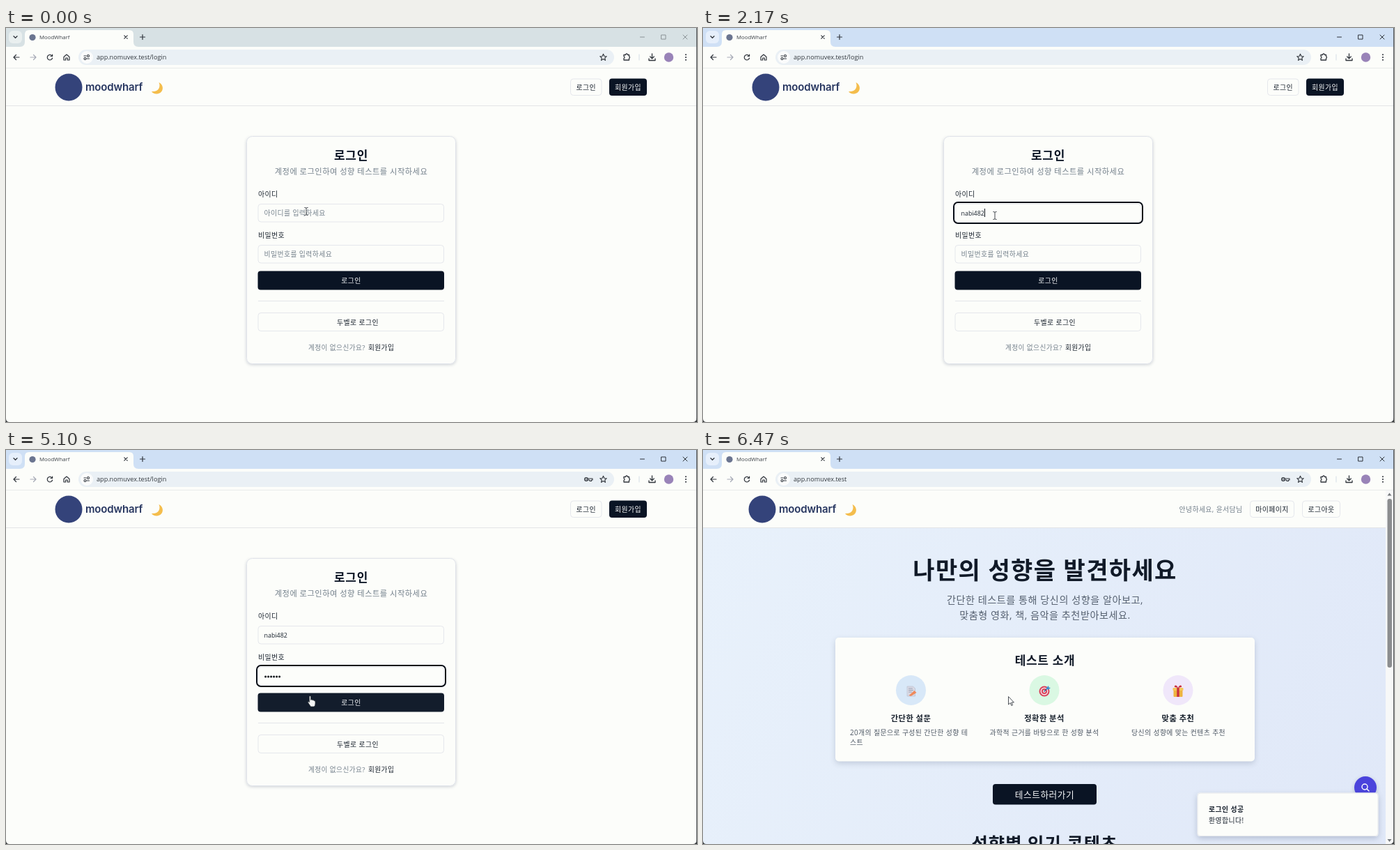
These frames come from a looping animation (992 by 565 pixels, 6.53 s). An HTML page with a canvas:

```html
<!DOCTYPE html>
<html lang="ko">
<head>
<meta charset="utf-8">
<title>MoodWharf</title>
<style>
html, body { margin: 0; width: 100%; height: 100%; overflow: hidden; background: #fcfdfa; }
canvas { display: block; }
</style>
</head>
<body>
<canvas id="stage" width="992" height="565"></canvas>
<script>
const W = 992, H = 565, LOOP = 6530;
const ctx = document.getElementById('stage').getContext('2d');
const SANS = '"Open Sans", "Noto Sans CJK KR", "Noto Sans CJK", "Noto Sans KR", sans-serif';
const PAPER = '#fcfdfa', DARK = '#0a1424', INK = '#18212d', MUTED = '#74808c', LINE = '#e5e7ec';
const BRAND = 'moodwharf', HOST = 'app.nomuvex.test', USER = 'nabi482';

// Moments of the story, in ms
const T = {
  focusId: 130, focusPw: 3070, key: 3770, hover: 5030,
  press: 5970, loading: 6070, home: 6330, toast: 6370
};
const ID_KEYS = [1270, 1370, 1470, 1600, 2000, 2070, 2170];
const PW_KEYS = [3770, 3870, 4000, 4270, 4320, 4370];
const MOVES = [
  { from: 30, to: 400, x: 419, y: 269 },
  { from: 2700, to: 3000, x: 426, y: 323 },
  { from: 4900, to: 5070, x: 439, y: 360 }
];

const clamp = v => Math.max(0, Math.min(1, v));
const span = (t, a, b) => clamp((t - a) / (b - a));
const ease = p => p * p * (3 - 2 * p);
const easeOut = p => 1 - (1 - p) ** 3;
const lerp = (a, b, p) => a + (b - a) * p;
const mix = (a, b, p) => `rgb(${a.map((v, i) => Math.round(lerp(v, b[i], p)))})`;

function box(x, y, w, h, r, fill, stroke, lw = 1) {
  ctx.beginPath();
  ctx.roundRect(x, y, w, h, r);
  if (fill) { ctx.fillStyle = fill; ctx.fill(); }
  if (stroke) { ctx.strokeStyle = stroke; ctx.lineWidth = lw; ctx.stroke(); }
}

function outline(x, y, w, h, r, fill = PAPER) {
  box(x + .5, y + .5, w - 1, h - 1, r, fill, LINE);
}

function shadowed(x, y, w, h, r, fill, blur, dy, alpha) {
  ctx.save();
  ctx.shadowColor = `rgba(40, 55, 90, ${alpha})`;
  ctx.shadowBlur = blur;
  ctx.shadowOffsetY = dy;
  box(x, y, w, h, r, fill);
  ctx.restore();
}

function disc(x, y, r, fill) {
  ctx.beginPath();
  ctx.arc(x, y, r, 0, 7);
  ctx.fillStyle = fill;
  ctx.fill();
}

function ring(x, y, r, color, lw) {
  ctx.beginPath();
  ctx.arc(x, y, r, 0, 7);
  ctx.strokeStyle = color;
  ctx.lineWidth = lw;
  ctx.stroke();
}

// SVG path data placed at x, y
function shape(d, x, y, { fill, stroke, lw = 1.2 }) {
  const path = new Path2D(d);
  ctx.save();
  ctx.translate(x, y);
  ctx.lineCap = ctx.lineJoin = 'round';
  if (fill) { ctx.fillStyle = fill; ctx.fill(path); }
  if (stroke) { ctx.strokeStyle = stroke; ctx.lineWidth = lw; ctx.stroke(path); }
  ctx.restore();
}

// Text whose glyphs are centred on y
function text(s, x, y, size, color, { align = 'left', weight = 400, track = .04, font = SANS } = {}) {
  ctx.font = `${weight} ${size}px ${font}`;
  ctx.letterSpacing = `${track * size}px`;
  ctx.textAlign = align;
  ctx.fillStyle = color;
  ctx.fillText(s, x, y + size * .37);
}
const centered = (s, x, y, size, color, weight = 400) =>
  text(s, x, y, size, color, { align: 'center', weight });
const latin = (s, x, y, size, color) => text(s, x, y, size, color, { track: 0 });

function button(label, x, w, dark) {
  if (dark) box(x, 72.5, w, 24.5, 4, DARK);
  else outline(x, 72.5, w, 24.5, 4);
  centered(label, x + w / 2, 85, 9.9, dark ? '#fafbfc' : INK);
}

function drawBrowser(t) {
  const active = t >= T.focusId, home = t >= T.home;
  const icon = '#30353c', controls = active ? '#2c3138' : '#8a9296';
  ctx.fillStyle = active ? '#cfe0f5' : '#d7e1e4';
  ctx.fillRect(0, 0, W, 28);
  box(4, 4, 19, 18, 6, active ? '#e6effb' : '#e9efef');
  shape('M-2.5-1.2L0 1.3 2.5-1.2', 13.5, 13, { stroke: icon, lw: 1.3 });
  shape('M20 27q7 0 7-7V9q0-6 6-6H177q6 0 6 6V20q0 7 7 7z', 0, 0, { fill: PAPER });
  disc(38, 13.5, 4.6, '#6b7590');
  latin('MoodWharf', 48, 13.5, 7.8, '#3b4148');
  shape('M-2.2-2.2L2.2 2.2M2.2-2.2L-2.2 2.2', 172, 13, { stroke: icon });
  shape('M-3.5 0H3.5M0-3.5V3.5', 196, 13, { stroke: icon });
  shape('M910.500 13H916.500M941 10H947V16H941zM972 10L978 16M978 10L972 16', 0, 0, { stroke: controls, lw: 1 });

  ctx.fillStyle = PAPER;
  ctx.fillRect(0, 27, W, 31);
  box(104, 31, 769, 22, 11, '#eaf0f5');
  const arrow = 'M4 0H-4M-.5-3.500L-4 0L-.5 3.500';
  shape(arrow, 15, 42, { stroke: icon });
  shape('M-4 0H4M.5-3.500L4 0L.5 3.500', 39, 42, { stroke: '#a5a9b5' });
  shape('M3-2A3.700 3.700 0 1 0 3.600 1M3.600-4V-1.500H1', 63, 42, { stroke: icon });
  shape('M-4-.5L0-4 4-.5V4H1.300V1H-1.300V4H-4z', 87, 42, { stroke: icon });
  disc(116, 42, 9, '#fbfcfc');
  shape('M-4-2H-1M3.500 2H0', 116, 42, { stroke: icon });
  ring(118, 40, 1.5, icon, 1.1);
  ring(113.5, 44, 1.5, icon, 1.1);
  latin(HOST + (home ? '' : '/login'), 130, 42, 9.1, '#33393f');
  if (t >= T.key) {
    ring(833, 42, 2.3, icon, 1.3);
    disc(833, 42, .8, icon);
    shape('M2.300-1H9V1H7.500V2.500H5V1H2.300', 833, 42, { stroke: icon, lw: 1.1 });
  }
  shape('M0-4.800L1.400-1.500 4.800-1.300 2.200 1 3 4.400 0 2.500-3 4.400-2.200 1-4.800-1.300-1.400-1.500z', 857.5, 42, { stroke: icon, lw: 1.1 });
  shape('M-4-3H-1.500A1.500 1.500 0 0 1 1.500-3H3.500V-.8A1.500 1.500 0 0 1 3.500 2V4.500H-4V2A1.500 1.500 0 0 0-4-.8z', 891, 41.5, { stroke: icon, lw: 1.3 });
  shape('M0-4V4', 909, 42, { stroke: '#d4dde6', lw: 1 });
  shape('M0-5V1.500M-2.800-1L0 1.800 2.800-1M-4.500 2V4.500H4.500V2', 927.5, 42, { stroke: icon, lw: 1.3 });
  disc(951.5, 42, 6.7, '#9983b8');
  for (const dy of [-3.7, 0, 3.7]) disc(976, 42 + dy, 1.05, icon);
  ctx.fillStyle = '#e9ebea';
  ctx.fillRect(0, 57, W, 1);
}

function drawHeader(home) {
  const dx = home ? -5 : 0;
  ctx.fillStyle = PAPER;
  ctx.fillRect(0, 58, W, 53);
  ctx.fillStyle = '#e3e5e6';
  ctx.fillRect(0, 111, W, 1);
  disc(90 + dx, 85, 19.5, '#34437a');
  text(BRAND, 114 + dx, 84.5, 15, '#26355f', { weight: 600, track: -.01, font: 'Inter, sans-serif' });
  shape('M3-8C12-3 9 8 0 8.500C-4 8.500-6 7-7.500 5C2 6 6-1 3-8z', 216.5 + dx, 86, { fill: '#f4bd4c' });
  if (home) {
    centered('안녕하세요, 윤서담님', 729, 85, 9.9, MUTED);
    button('마이페이지', 785, 64);
    button('로그아웃', 860, 55);
  } else {
    button('로그인', 810, 45.5);
    button('회원가입', 866, 54, true);
  }
}

function field(y, focused) {
  if (focused) box(360, y - 2, 271, 30, 6, PAPER, '#080d16', 2);
  outline(361.5, y, 267.5, 26.5, 4);
}

// Caret blinks every half second, counted from the last key or click
function caret(t, start, keys, x, y) {
  const last = keys.filter(k => k <= t).pop() ?? start;
  if (Math.floor((t - last) / 531) % 2 === 0) {
    ctx.fillStyle = '#10151c';
    ctx.fillRect(Math.round(x), y - 6, 1, 12);
  }
}

function drawForm(t) {
  const onId = t >= T.focusId && t < T.focusPw;
  const onPw = t >= T.focusPw && t < T.press;
  const typed = USER.slice(0, ID_KEYS.filter(k => k <= t).length);
  const dots = PW_KEYS.filter(k => k <= t).length;

  shadowed(345, 155.5, 301, 326, 8, PAPER, 4, 1.5, .22);
  box(345.5, 155.5, 300, 326, 8, PAPER, '#e0e3ea');
  centered('로그인', 495.5, 183, 17, DARK, 700);
  centered('계정에 로그인하여 성향 테스트를 시작하세요', 495.5, 206, 11.3, MUTED);

  text('아이디', 362, 238, 9.9, INK);
  field(252, onId);
  if (typed) latin(typed, 370.5, 265.5, 8.9, INK);
  else text('아이디를 입력하세요', 370.5, 265, 9.9, MUTED);
  if (onId) caret(t, T.focusId, ID_KEYS, 370.5 + (typed ? ctx.measureText(typed).width : 0), 265);

  text('비밀번호', 362, 297.5, 9.9, INK);
  field(311, onPw);
  if (!dots) text('비밀번호를 입력하세요', 370.5, 324, 9.9, MUTED);
  for (let i = 0; i < dots; i++) disc(372.6 + i * 4, 325, 1.55, '#10151c');
  if (onPw) caret(t, T.focusPw, PW_KEYS, 370.5 + dots * 4, 324);

  const loading = t >= T.loading;
  const fill = loading
    ? mix([28, 38, 53], [130, 135, 143], span(t, T.loading, T.loading + 150))
    : mix([10, 20, 36], [28, 38, 53], span(t, T.hover, T.hover + 150));
  box(361.5, 348.5, 267.5, 27, 4, fill);
  centered(loading ? '로그인 중...' : '로그인', 495.5, 362, 9.9, '#f5f7f9');

  ctx.fillStyle = '#e3e5ea';
  ctx.fillRect(362, 391, 267, 1);
  outline(361.5, 408, 267.5, 27, 4);
  centered('두벨로 로그인', 505, 422, 9.9, INK);
  text('계정이 없으신가요?', 434, 458.5, 9.7, MUTED);
  text('회원가입', 520, 458.5, 9.7, INK);
}

function drawMemo(x, y) {
  shape('M-5-7H3L6-4V7H-5z', x, y, { fill: '#d9d9e4', stroke: '#b9bccb', lw: .7 });
  shape('M-3-4H2M-3-1.500H3M-3 1H1', x, y, { stroke: '#8b93a8', lw: .8 });
  shape('M-3 6L5-1 8 2 0 7z', x, y, { fill: '#ee8a5c' });
}

function drawTarget(x, y) {
  [[7.5, '#d9415b'], [5.5, '#f6e9ea'], [4, '#d9415b'], [2, '#f6e9ea']].forEach(([r, c]) => disc(x, y, r, c));
  shape('M0 0L5-5', x, y, { stroke: '#2d5d8f', lw: 1.4 });
  shape('M3-5L6-8 6.500-5.500 9-5 6-2.500 3-3z', x, y, { fill: '#3c8fd0' });
}

function drawGift(x, y) {
  box(x - 6.5, y - 2, 13, 10, 1, '#eeb440');
  box(x - 7.5, y - 5, 15, 4, 1, '#f4c65a');
  box(x - 1.7, y - 5, 3.4, 13, 0, '#c9303e');
  shape('M0-5C-2-10-6-9-5-6zM0-5C2-10 6-9 5-6z', x, y, { fill: '#c9303e' });
}

function drawHome(t) {
  const sky = ctx.createLinearGradient(0, 112, 980, 565);
  sky.addColorStop(0, '#e8f1fb');
  sky.addColorStop(1, '#e0e8f8');
  ctx.fillStyle = sky;
  ctx.fillRect(0, 112, 981, H - 112);

  centered('나만의 성향을 발견하세요', 491, 172, 34, '#111a28', 700);
  centered('간단한 테스트를 통해 당신의 성향을 알아보고,', 491, 214.5, 14.1, '#566170');
  centered('맞춤형 영화, 책, 음악을 추천받아보세요.', 491, 237, 14.1, '#566170');

  shadowed(190, 269, 602, 177.5, 5, PAPER, 8, 3, .2);
  centered('테스트 소개', 491, 301.5, 17, '#111a28', 700);
  const items = [
    [298.5, '#d8e8f8', drawMemo, '간단한 설문', 211, ['20개의 질문으로 구성된 간단한 성향 테', '스트']],
    [490, '#daf8e3', drawTarget, '정확한 분석', 411.5, ['과학적 근거를 바탕으로 한 성향 분석']],
    [682, '#f0e7fa', drawGift, '맞춤 추천', 615, ['당신의 성향에 맞는 컨텐츠 추천']]
  ];
  for (const [x, tint, draw, title, left, lines] of items) {
    disc(x, 344.5, 21.5, tint);
    draw(x, 346);
    centered(title, x, 385, 11.3, INK, 600);
    lines.forEach((s, i) => text(s, left, 405.5 + i * 13.5, 9.9, '#4d5764'));
  }
  box(416, 479, 149, 29.5, 4, DARK);
  centered('테스트하러가기', 490.5, 494, 12.7, '#f5f7f9');
  centered('성향별 인기 콘텐츠', 490.5, 564.5, 25.4, '#111a28', 700);

  shadowed(935, 468, 32, 32, 16, '#4a43dc', 6, 2, .25);
  ring(950, 483, 4, '#fff', 1.4);
  shape('M3 3L6 6', 950, 483, { stroke: '#fff', lw: 1.4 });

  if (t >= T.toast) {
    const y = lerp(565, 491.5, easeOut(span(t, T.toast, T.toast + 100)));
    shadowed(709.5, y, 260, 62.5, 4, PAPER, 8, 3, .25);
    outline(709.5, y, 260, 62.5, 4);
    text('로그인 성공', 726, y + 23.5, 9.9, INK, { weight: 600 });
    text('환영합니다!', 726, y + 39.5, 9.9, INK);
  }

  ctx.fillStyle = '#f7f8f8';
  ctx.fillRect(980, 58, 11, H - 58);
  box(982.5, 70, 6.5, 242, 3.2, '#8b8d8f');
  shape('M-3 2L0-2 3 2z', 985.5, 63.5, { fill: '#777b7e' });
  shape('M-3-2L0 2 3-2z', 985.5, 560, { fill: '#777b7e' });
}

function drawCursor(t) {
  let x = 431, y = 263;
  for (const m of MOVES) {
    const p = ease(span(t, m.from, m.to));
    x = lerp(x, m.x, p);
    y = lerp(y, m.y, p);
  }
  const arrow = 'M0 0V11L2.600 8.600 4.400 12.500 6 11.800 4.300 8H7.500z';
  if (t >= T.loading || (y > 338 && y < 348.5)) {
    shape(arrow, x - .5, y - 6, { fill: '#fff', stroke: '#20262e', lw: .8 });
  } else if (y >= 348.5) {
    shape('M-3.500-6.500Q-2.500-8-1.500-6.500V-1.500Q0-3 1-1.200Q2.500-2 3-.5Q5-1 5 1V4Q5 7 3 8H-1.500L-5.500 2Q-5 0-3.500 1.500z',
      x, y, { fill: '#f4f5f5', stroke: '#30353c', lw: .7 });
  } else {
    shape('M-2.200-5.500Q-.3-5.500 0-4.500Q.3-5.500 2.200-5.500M0-4.500V4.500M-2.200 5.500Q-.3 5.500 0 4.500Q.3 5.500 2.200 5.500',
      x, y, { stroke: '#42474d', lw: 1 });
  }
}

function drawEdge() {
  ctx.fillStyle = '#55595c';
  ctx.fillRect(991, 0, 1, H);
  shape('M0 560Q0 565 5 565H0zM992 559Q991 565 986 565H992z', 0, 0, { fill: '#33373a' });
}

function render(t) {
  const home = t >= T.home;
  ctx.fillStyle = PAPER;
  ctx.fillRect(0, 0, W, H);
  drawBrowser(t);
  drawHeader(home);
  if (home) drawHome(t);
  else drawForm(t);
  drawCursor(t);
  drawEdge();
}

const start = performance.now();
function tick() {
  render((performance.now() - start) % LOOP);
  requestAnimationFrame(tick);
}
tick();
</script>
</body>
</html>
```
